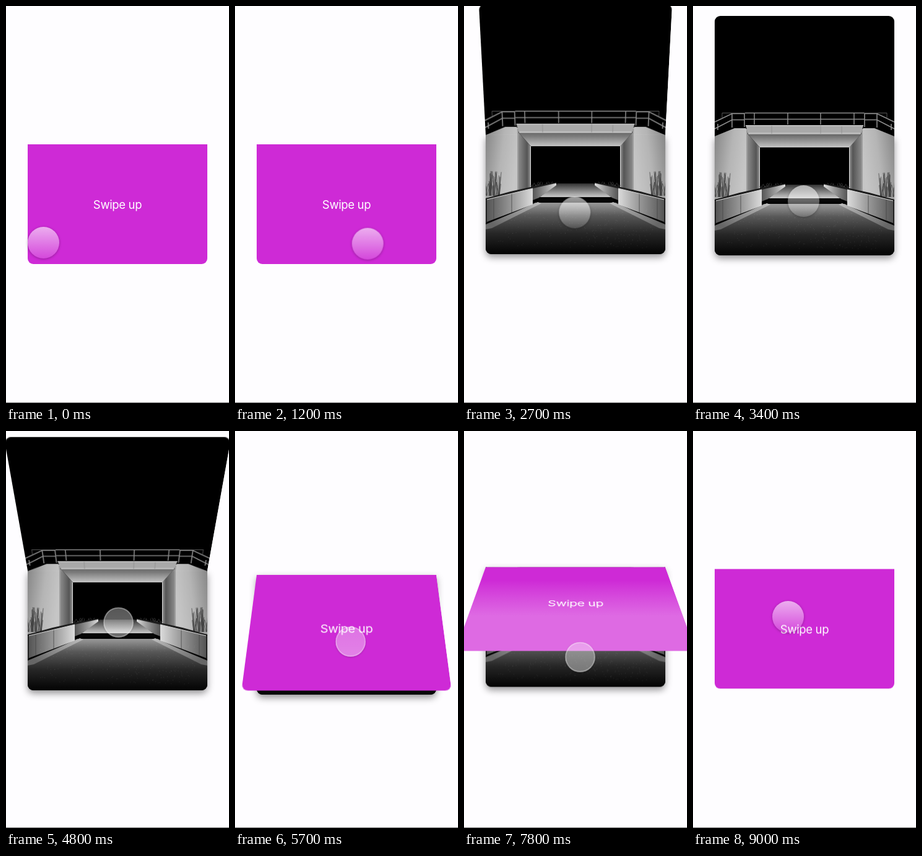
An HTML page for the animation above (9.1 s loop, 360 by 640 pixels).

```html
<!DOCTYPE html>
<html lang="en">
<head>
<meta charset="utf-8">
<title>Fold card</title>
<style>
  html, body { margin: 0; width: 100%; height: 100%; overflow: hidden; background: #fefdff; }
  .stage { position: relative; width: 360px; height: 640px; overflow: hidden; }
  .stage::after { content: ""; position: absolute; left: 0; right: 0; bottom: 0; height: 1px; background: #777; }
  .defs { position: absolute; }

  .card, .base, .flap, .front, .ball { animation: 9100ms linear infinite; }
  .card {
    position: absolute; left: 34.5px; top: 223px; width: 290px; height: 193px;
    perspective: 580px; perspective-origin: 50% 50%; animation-name: lift;
  }
  .base, .flap, .front, .back { position: absolute; inset: 0; }
  .base, .front { border-radius: 0 0 9px 9px; }
  .base { overflow: visible; box-shadow: 0 5px 12px rgba(0,0,0,.42); animation-name: reveal; }
  .base svg, .back svg { display: block; border-radius: inherit; }
  .flap { transform-origin: 50% 0; transform-style: preserve-3d; animation-name: fold; }
  .front, .back { backface-visibility: hidden; }
  .front {
    display: flex; align-items: center; justify-content: center;
    font: 18.5px Inter, Roboto, sans-serif; letter-spacing: -.35px; color: #fff;
    background: linear-gradient(#ce2ad6 40%, #de6ae3 55%) 0 0 / 100% 300%;
    animation-name: sheen;
  }
  .back { transform: rotateX(180deg); border-radius: 9px 9px 0 0; }

  .ball {
    position: absolute; left: -25.5px; top: -25.5px; width: 51px; height: 51px; border-radius: 50%;
    animation-name: wander, press;
  }
  .ball i { position: absolute; inset: 0; border-radius: 50%; animation: 9100ms linear infinite; }
  .idle {
    background: linear-gradient(rgba(255,255,255,.62), rgba(255,255,255,.14));
    box-shadow: 0 1px 4px rgba(0,0,0,.28); animation-name: idle !important;
  }
  .held {
    background: linear-gradient(rgba(255,255,255,.34), rgba(255,255,255,.42));
    box-shadow: inset 0 0 0 1.3px rgba(255,255,255,.5), 0 1px 3px rgba(0,0,0,.25);
    animation-name: held !important;
  }

  @keyframes fold {
    0%, 17.03% { transform: rotateX(0deg); }
    21.98% { transform: rotateX(57.8deg); }
    25.27% { transform: rotateX(100deg); animation-timing-function: ease-out; }
    31.87%, 49.45% { transform: rotateX(180deg); }
    52.75% { transform: rotateX(141deg); }
    54.95% { transform: rotateX(115deg); }
    62.64% { transform: rotateX(26deg); animation-timing-function: ease-out; }
    68.13%, 79.67% { transform: rotateX(0deg); }
    85.71% { transform: rotateX(49.4deg); }
    87.91%, 89.01% { transform: rotateX(57deg); animation-timing-function: ease-in-out; }
    94.5%, 100% { transform: rotateX(0deg); }
  }
  @keyframes lift {
    0%, 17.03% { transform: translateY(0); }
    21.98% { transform: translateY(-4px); }
    25.27% { transform: translateY(-8px); }
    29.67% { transform: translateY(-16px); }
    34.07%, 49.45% { transform: translateY(-14px); }
    52.75% { transform: translateY(2px); }
    54.95% { transform: translateY(5px); }
    62.64% { transform: translateY(9px); animation-timing-function: ease-out; }
    68.13%, 79.67% { transform: translateY(0); }
    85.71%, 89.01% { transform: translateY(-3.5px); }
    94.5%, 98.9% { transform: translateY(-.5px); }
    100% { transform: translateY(0); }
  }
  @keyframes reveal {
    0%, 17.03% { opacity: 0; }
    18.5%, 65.5% { opacity: 1; }
    68.13%, 79.67% { opacity: 0; }
    81.2%, 92.5% { opacity: 1; }
    94.5%, 100% { opacity: 0; }
  }
  @keyframes sheen {
    0%, 18.2% { background-position: 0 0; }
    21.98% { background-position: 0 -125px; }
    24.2%, 55% { background-position: 0 -193px; }
    60%, 80.5% { background-position: 0 0; }
    85.71%, 89.01% { background-position: 0 -193px; }
    93%, 100% { background-position: 0 0; }
  }
  @keyframes wander {
    0% { translate: 60px 381px; animation-timing-function: ease-in-out; }
    5.5% { translate: 292px 352px; animation-timing-function: ease-in-out; }
    11% { translate: 230px 385px; animation-timing-function: ease-in-out; }
    16.48% { translate: 181px 378px; }
    21.98% { translate: 180px 362px; }
    25.27% { translate: 179px 350px; }
    30.77% { translate: 178px 328px; }
    37.36% { translate: 178px 314px; }
    49.45% { translate: 180px 297.5px; }
    52.75% { translate: 181px 308px; }
    62.64% { translate: 186px 339px; }
    65.93% { translate: 190px 352px; animation-timing-function: ease-in-out; }
    69.78% { translate: 300px 400px; animation-timing-function: ease-in-out; }
    73.63% { translate: 220px 412px; animation-timing-function: ease-in-out; }
    79.67% { translate: 188px 377px; }
    85.71% { translate: 187px 364px; }
    89.01% { translate: 186px 355px; animation-timing-function: ease-out; }
    98.9%, 100% { translate: 153px 299px; }
  }
  @keyframes press {
    0%, 15.4%, 26.9%, 47.8%, 64.8%, 78%, 90.1%, 100% { scale: 1; }
    16.9%, 25.8%, 49%, 63.5%, 79.3%, 89% { scale: .945; }
  }
  @keyframes idle {
    0%, 15.4%, 26.9%, 47.8%, 64.8%, 78%, 90.1%, 100% { opacity: 1; }
    16.9%, 25.8%, 49%, 63.5%, 79.3%, 89% { opacity: 0; }
  }
  @keyframes held {
    0%, 15.4%, 26.9%, 47.8%, 64.8%, 78%, 90.1%, 100% { opacity: 0; }
    16.9%, 25.8%, 49%, 63.5%, 79.3%, 89% { opacity: 1; }
  }
</style>
</head>
<body>
<svg class="defs" width="0" height="0" aria-hidden="true">
  <defs>
    <linearGradient id="wall" x2="1" y2=".3">
      <stop stop-color="#858585"/><stop offset=".55" stop-color="#b5b5b5"/><stop offset="1" stop-color="#c6c6c6"/>
    </linearGradient>
    <linearGradient id="pillar">
      <stop stop-color="#8a8a8a"/><stop offset=".7" stop-color="#555"/><stop offset="1" stop-color="#999"/>
    </linearGradient>
    <linearGradient id="soffit" x2="0" y2="1">
      <stop stop-color="#666"/><stop offset="1" stop-color="#c4c4c4"/>
    </linearGradient>
    <linearGradient id="curb">
      <stop stop-color="#555"/><stop offset=".6" stop-color="#a0a0a0"/><stop offset="1" stop-color="#dcdcdc"/>
    </linearGradient>
    <linearGradient id="far" x2="0" y2="1">
      <stop stop-color="#333"/><stop offset="1" stop-color="#d2d2d2"/>
    </linearGradient>
    <linearGradient id="road" x2="0" y2="1">
      <stop stop-color="#9a9a9a"/><stop offset=".25" stop-color="#585858"/>
      <stop offset=".6" stop-color="#262626"/><stop offset="1" stop-color="#030303"/>
    </linearGradient>
    <linearGradient id="edge" x1="1" x2="0" y2=".6">
      <stop stop-color="#c0c0c0"/><stop offset="1" stop-color="#666"/>
    </linearGradient>

    <!-- left side of the underpass, mirrored for the right -->
    <g id="side">
      <g fill="none" stroke="#8c8c8c" stroke-width="1.6">
        <path d="M0 171 28 157.500H48V179M0 182 28 167.500H48M28 157V180M5 174V184"/>
        <path d="M12 164V156.500H49" stroke="#555" stroke-width="1"/>
      </g>
      <path d="M53 190 73 212V279L53 286Z" fill="url(#pillar)"/>
      <path d="M72.500 212V279" stroke="#ddd"/>
      <path d="M0 194 32 181H50L53 184V286L0 296Z" fill="url(#wall)"/>
      <path d="M52 184V286" stroke="#777"/>
      <path class="grass" fill="none" stroke="#3c3c3c" stroke-width=".7"/>
      <path class="weeds" fill="none" stroke="#555" stroke-width=".6"/>
      <path d="M0 296 40 285 76 277 114 270 114 275 76 281 2 299Z" fill="#1c1c1c"/>
      <path d="M76 280 114 271.500 114 275 86 295 76 299Z" fill="url(#curb)"/>
      <path d="M2 298 76 280V306L2 334Z" fill="url(#curb)"/>
      <path d="M2 298 76 280" stroke="#ddd"/>
      <path d="M13 296V330M42 289V319" stroke="#444" stroke-width=".8"/>
      <path d="M0 298H2V335L0 336Z" fill="#222"/>
      <path d="M76 306 84 302 90 304 10 344 0 346V338Z" fill="url(#edge)"/>
    </g>

    <g id="photo">
      <path d="M0 0H290V386H0Z"/>
      <path d="M116 272H174L204 295H86Z" fill="url(#far)"/>
      <path d="M80 303H210L290 342V386H0V342Z" fill="url(#road)"/>
      <path d="M84 294H206V302H84Z" fill="#060606"/>
      <path d="M50 176H240L236 191H54Z" fill="#a9a9a9"/>
      <path d="M50 177H240M54 189H236" stroke="#d2d2d2" stroke-width="1"/>
      <path d="M92 177V190M171 177V190M205 178V190" stroke="#888" stroke-width=".7"/>
      <path d="M54 191H236L218 212H73Z" fill="url(#soffit)"/>
      <path d="M49 156.500H242M49 166.500H242M64 156V175M118 156V175M171 156V175M225 156V175"
        fill="none" stroke="#8c8c8c" stroke-width="1.5"/>
      <use href="#side"/>
      <use href="#side" transform="translate(290) scale(-1 1)"/>
      <path class="grit" fill="none" stroke="#fff" stroke-opacity=".13" stroke-width=".8"/>
    </g>
  </defs>
</svg>

<div class="stage">
  <div class="card">
    <div class="base"><svg width="290" height="193" viewBox="0 193 290 193"><use href="#photo"/></svg></div>
    <div class="flap">
      <div class="front">Swipe up</div>
      <div class="back"><svg width="290" height="193" viewBox="0 0 290 193"><use href="#photo"/></svg></div>
    </div>
  </div>
  <div class="ball"><i class="idle"></i><i class="held"></i></div>
</div>

<script>
  let seed = 7;
  const rand = (lo, hi) => {
    seed = (seed * 16807) % 2147483647;
    return lo + (hi - lo) * seed / 2147483647;
  };
  const draw = (selector, count, stroke) => {
    const parts = Array.from({ length: count }, stroke);
    document.querySelector(selector).setAttribute('d', parts.join(''));
  };
  const blade = (left, right, ground, height) => () =>
    `M${rand(left, right)} ${ground}l${rand(-5, 5)} ${-rand(height / 4, height)}`;

  draw('.grass', 34, blade(0, 24, 292, 42));
  draw('.weeds', 26, blade(74, 108, 277, 8));
  draw('.grit', 260, () => `M${rand(20, 270)} ${rand(312, 376)}h1`);
</script>
</body>
</html>
```
